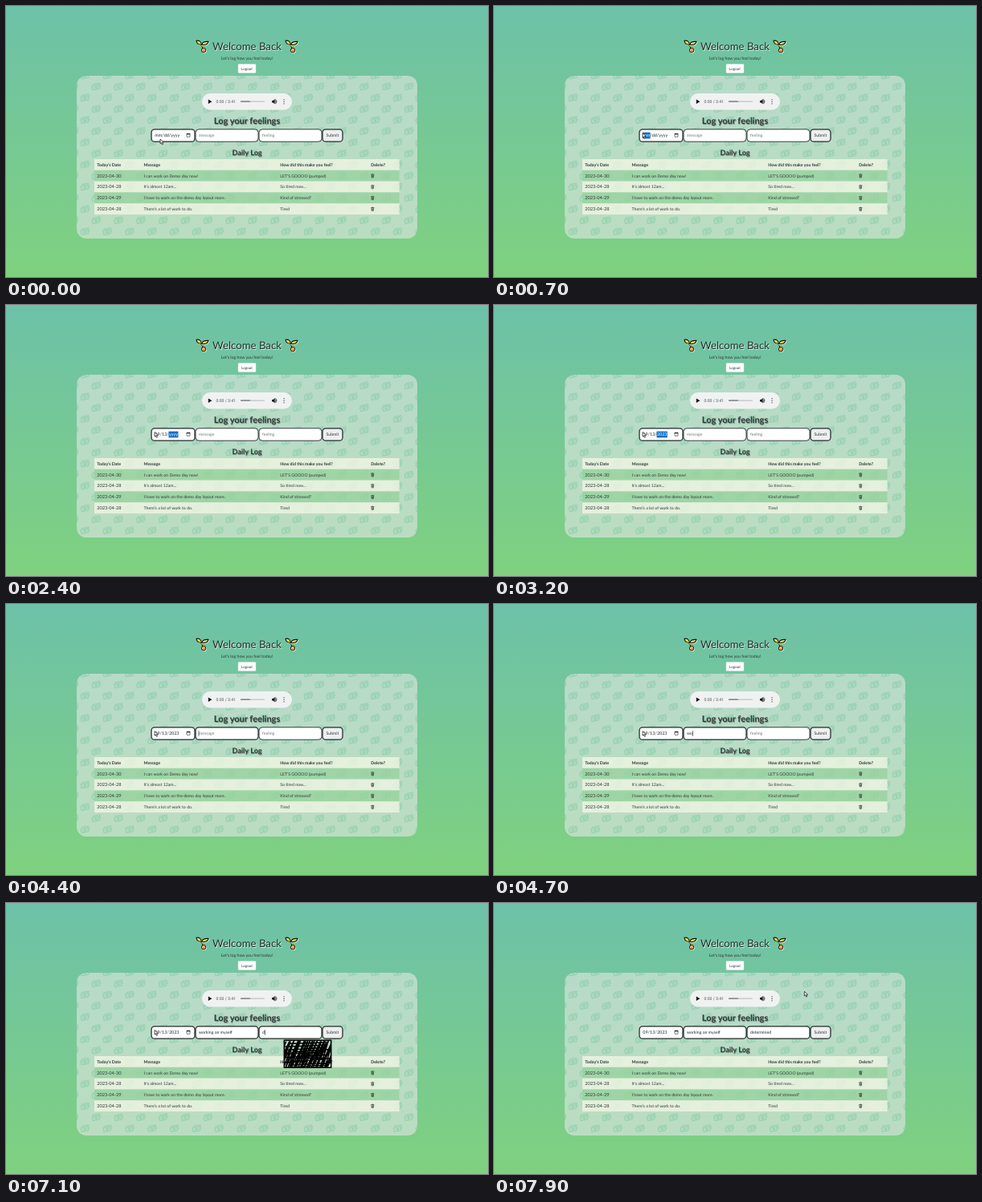
Recreate the animation shown at these times as an HTML page with a canvas. Size 600x338 px, loop 8000 ms.

```html
<!DOCTYPE html>
<html lang="en">
<head>
<meta charset="utf-8">
<title>Daily log</title>
<style>
html, body { margin: 0; width: 100%; height: 100%; overflow: hidden; background: #76c898; }
canvas { display: block; width: 600px; height: 338px; }
</style>
</head>
<body>
<canvas id="stage"></canvas>
<script>
const canvas = document.getElementById('stage');
const ctx = canvas.getContext('2d');
const scale = window.devicePixelRatio || 1;
const LOOP = 8000, STEP = 100;
const INK = '#30363a', BLUE = '#0b70c9';
canvas.width = 600 * scale;
canvas.height = 338 * scale;
ctx.textRendering = 'geometricPrecision';

function text(str, x, y, size = 5.2, { color = INK, weight = 400, align = 'left', family = 'Lato' } = {}) {
  ctx.font = `${weight} ${size}px ${family}, sans-serif`;
  ctx.textAlign = align;
  ctx.fillStyle = color;
  ctx.fillText(str, x, y);
  return ctx.measureText(str).width;
}

function box(x, y, w, h, r, fill, stroke, width = 1) {
  ctx.beginPath();
  ctx.roundRect(x, y, w, h, r);
  if (fill) { ctx.fillStyle = fill; ctx.fill(); }
  if (stroke) { ctx.strokeStyle = stroke; ctx.lineWidth = width; ctx.stroke(); }
}

function shape(path, x, y, fill, stroke, width = 1) {
  const p = new Path2D(path);
  ctx.save();
  ctx.translate(x, y);
  if (fill) { ctx.fillStyle = fill; ctx.fill(p); }
  if (stroke) { ctx.strokeStyle = stroke; ctx.lineWidth = width; ctx.stroke(p); }
  ctx.restore();
}

function withShadow(color, offset, blur, paint) {
  ctx.save();
  ctx.shadowColor = color;
  ctx.shadowBlur = blur * scale;
  ctx.shadowOffsetX = ctx.shadowOffsetY = offset * scale;
  paint();
  ctx.restore();
}

function heading(str, y, size) {
  withShadow('rgba(40,60,50,.5)', 0.7, 0.8, () =>
    text(str, 300, y, size, { weight: 700, align: 'center', color: '#343a3c' }));
}

function sprout(x, y) {
  const stem = 'M6.8 6 Q9.6 7 10 11.5';
  shape(stem, x, y, null, '#111', 3.2);
  shape(stem, x, y, null, '#8bbf2c', 1.4);
  shape('M1 1.3 Q6.3 0 7.5 6.2 Q1.7 6.8 1 1.3Z', x, y, '#d3dd2c', '#111', 1.1);
  shape('M7.8 6.2 Q8.7 1.8 16 2.4 Q14.7 7.6 7.8 6.2Z', x, y, '#d3dd2c', '#111', 1.1);
  shape('M7.4 13.2 a2.7 2.7 0 1 0 5.4 0 a2.7 2.7 0 1 0 -5.4 0', x, y, '#f59a2f', '#111', 1);
}

function title() {
  withShadow('rgba(235,250,240,.85)', 0.7, 0.6, () => {
    sprout(236, 42);
    sprout(347, 42);
    text('Welcome Back', 300, 54.8, 13.2, { align: 'center', color: '#272d2f' });
  });
  text('Let’s log how you feel today!', 300, 67, 5.2, { align: 'center' });
  box(289, 72.5, 22, 11, 1, '#fff', '#d5e3dc', 0.5);
  text('Logout', 300, 79.8, 4.6, { align: 'center' });
}

function pattern() {
  const pitch = 27.8;
  for (let row = 0; row < 16; row++) {
    for (let col = 0; col < 17; col++) {
      ctx.save();
      ctx.translate(98 + (col - row % 2 / 2) * pitch, 86.7 + row * pitch / 2);
      ctx.rotate(-0.2);
      box(-4.8, -2, 9, 5.4, 0.5, 'rgba(125,205,160,.16)', 'rgba(95,186,145,.5)', 0.7);
      shape('M-3.6 -3.6 H5.6 V1.6 M-1 0.7 a1.1 1.1 0 1 0 2.2 0 a1.1 1.1 0 1 0 -2.2 0',
        0, 0, null, 'rgba(95,186,145,.5)', 0.7);
      ctx.restore();
    }
  }
}

function background() {
  const g = ctx.createLinearGradient(0, 0, 0, 338);
  g.addColorStop(0, '#6dc1a8');
  g.addColorStop(1, '#7fd17f');
  ctx.fillStyle = g;
  ctx.fillRect(0, 0, 600, 338);
  ctx.save();
  box(88, 87, 424, 203, 12, 'rgba(213,228,219,.7)');
  ctx.clip();
  pattern();
  ctx.restore();
}

function player() {
  box(244, 109, 112, 20.5, 10.2, '#f0f2f2');
  shape('M0 0 L4.6 2.8 L0 5.6Z', 251.8, 116.5, '#111');
  text('0:00 / 3:41', 261.5, 121.2, 5.15, { family: 'Roboto', color: '#50565a' });
  box(292, 118.5, 30, 1.3, 0.6, '#bfc2c2');
  box(292, 118.5, 12, 1.3, 0.6, '#777');
  shape('M0 2 H1.6 L3.6 0 V6.4 L1.6 4.4 H0Z', 331, 116, '#111');
  shape('M4.4 1.7 Q5.4 3.2 4.4 4.7 M4.6 0.3 Q7.4 3.2 4.6 6.1', 331, 116, null, '#111', 0.7);
  for (const y of [116.8, 119.3, 121.8]) box(345.4, y - 0.65, 1.3, 1.3, 0.65, '#222');
}

function trash(x, y) {
  shape('M0 0.8 H4 M1.3 0.4 H2.7 M0.6 1 L0.9 4.7 H3.1 L3.4 1 M1.6 1.8 V4 M2.4 1.8 V4', x, y, null, '#222', 0.6);
}

const COLUMNS = [113.3, 171.5, 341.3, 454.3];
const ROWS = [
  ['2023-04-30', 'I can work on Demo day now!', 'LET’S GOOOO (pumped)'],
  ['2023-04-28', 'It’s almost 12am...', 'So tired now...'],
  ['2023-04-29', 'I have to work on the demo day layout more.', 'Kind of stressed?'],
  ['2023-04-28', 'There’s a lot of work to do.', 'Tired']
];

function table() {
  const height = 13.8;
  for (let i = 0; i < 5; i++) {
    ctx.fillStyle = i % 2 ? 'rgba(150,211,155,.72)' : 'rgba(242,247,228,.78)';
    ctx.fillRect(110, 191 + i * height, 379.6, height);
  }
  ['Today’s Date', 'Message', 'How did this make you feel?', 'Delete?'].forEach((label, i) =>
    text(label, COLUMNS[i], 199.6, 5.25, { weight: 700 }));
  ROWS.forEach((row, i) => {
    const y = 213.5 + i * height;
    row.forEach((cell, c) => text(cell, COLUMNS[c], y, c ? 5.2 : 5.6));
    trash(454.3, y - 4.2);
  });
}

function field(x, w, strong, fill = '#fff') {
  box(x, 153.8, w, 15.4, 4, fill, '#22282a', strong ? 1.25 : 0.9);
}

// Value of the last entry [time, value] that has been reached.
function at(t, keys) {
  return keys.filter(k => k[0] <= t).pop()[1];
}

function ramp(t, keys) {
  const i = keys.findIndex(k => k[0] > t);
  if (i === 0) return keys[0][1];
  if (i < 0) return keys[keys.length - 1][1];
  const [[t0, a], [t1, b]] = [keys[i - 1], keys[i]];
  return a + (b - a) * (t - t0) / (t1 - t0);
}

const FOCUS = [[0, ''], [600, 'mm'], [1500, 'dd'], [2300, 'yyyy'], [3700, 'icon'],
  [4100, 'message'], [6400, 'feeling'], [7600, 'submit'], [7900, '']];
const MONTH = [[0, 'mm'], [1500, '09']];
const DAY = [[0, 'dd'], [1900, '01'], [2200, '13']];
const YEAR = [[0, 'yyyy'], [2500, '0002'], [2700, '0020'], [2900, '0202'], [3100, '2023']];
const MESSAGE_KEYS = [[4500, 0], [5300, 11], [5400, 11], [5600, 13], [5800, 17]];
const FEELING_KEYS = [[6500, 0], [6600, 1], [7100, 1], [7500, 10]];

function dateField(t, focus) {
  field(181, 54, true);
  let x = 185.3;
  [['mm', MONTH], ['dd', DAY], ['yyyy', YEAR]].forEach(([name, keys], i) => {
    if (i) x += text('/', x, 163.4, 5.4) + 0.1;
    const value = at(t, keys);
    const selected = focus === name;
    if (selected) {
      ctx.font = '400 5.4px Lato, sans-serif';
      ctx.fillStyle = BLUE;
      ctx.fillRect(x - 0.4, 157.6, ctx.measureText(value).width + 0.8, 7.8);
    }
    x += text(value, x, 163.4, 5.4, { color: selected ? '#fff' : '#202426' });
  });
  if (focus === 'icon') box(223.6, 158.2, 6.8, 6.8, 1, null, '#222', 0.6);
  box(225, 159.3, 4, 4, 0.4, null, '#222', 0.6);
  box(224.8, 159, 4.4, 1.3, 0.3, '#222');
}

function textField(x, name, value, focused, caret) {
  field(x, 78, focused || value);
  const w = text(value || name, x + 4, 163.4, 5.2, { color: value ? '#202426' : '#73787a' });
  if (focused && caret) {
    ctx.fillStyle = '#111';
    ctx.fillRect(x + 4 + (value ? w : -0.3), 158.2, 0.6, 6.6);
  }
}

function form(t) {
  const focus = at(t, FOCUS);
  const message = 'working on myself'.slice(0, ramp(t, MESSAGE_KEYS));
  const feeling = 'determined'.slice(0, ramp(t, FEELING_KEYS));
  dateField(t, focus);
  textField(236, 'message', message, focus === 'message', t < 6000);
  textField(315, 'feeling', feeling, focus === 'feeling', true);
  field(394, 25, true, '#eeefef');
  if (focus === 'submit') box(395.2, 154.8, 22.6, 13.4, 3, null, '#111', 0.6);
  text('Submit', 406.5, 163.4, 5.2, { align: 'center' });
}

function scribble() {
  let seed = 7;
  const random = () => (seed = seed * 16807 % 2147483647) / 2147483647;
  ctx.save();
  ctx.lineJoin = ctx.lineCap = 'round';
  ctx.strokeStyle = '#000';
  ctx.lineWidth = 1.5;
  ctx.strokeRect(346.3, 171.2, 58.4, 34);
  ctx.beginPath();
  ctx.rect(346, 171, 59, 34);
  ctx.clip();
  ctx.beginPath();
  // Steep hatching over the whole box, then flatter strokes across it.
  for (let x = 330; x < 405; x += 2.7) {
    ctx.lineTo(x + random() * 2, 204 + random() * 2);
    ctx.lineTo(x + 14 + random() * 5, 171 + random() * 3);
  }
  for (let y = 173; y < 205; y += 3.2) {
    ctx.moveTo(347 + random() * 6, y + 2 + random() * 2);
    ctx.lineTo(396 + random() * 8, y - 2 + random() * 3);
  }
  ctx.stroke();
  ctx.restore();
}

function pointer(t) {
  const move = Math.min(1, Math.max(0, (t - 100) / 400));
  const ease = move * move * (3 - 2 * move);
  const [x, y] = t >= 7900 ? [386.3, 110.3] : [192 - 7 * ease, 166 - 7.5 * ease];
  shape('M0 0 V5.6 L1.4 4.4 L2.4 6.8 L3.5 6.3 L2.5 4 H4.2Z', x, y, '#fff', '#222', 0.8);
}

function draw(now) {
  const t = Math.floor(now % LOOP / STEP) * STEP;
  ctx.setTransform(scale, 0, 0, scale, 0, 0);
  background();
  title();
  player();
  heading('Log your feelings', 147, 11);
  heading('Daily Log', 186, 9.1);
  table();
  form(t);
  if (t >= 6900 && t < 7500) scribble();
  pointer(t);
}

const start = performance.now();
function tick() {
  draw(performance.now() - start);
  requestAnimationFrame(tick);
}
tick();
</script>
</body>
</html>
```
